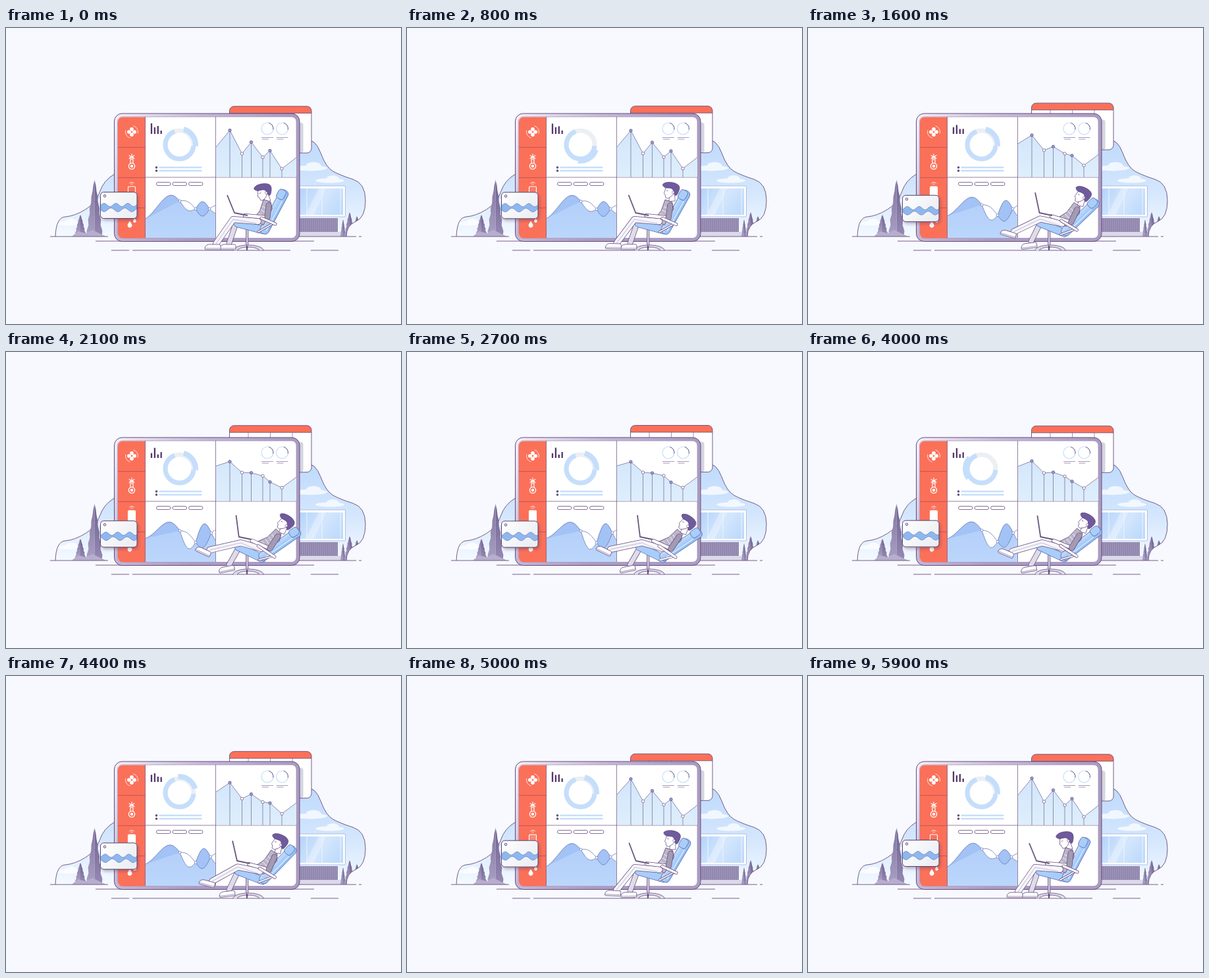
Animation, 600 px wide and 450 px high, one loop 6 s. Source, as an HTML page with a canvas:

```html
<!DOCTYPE html>
<html>
<head>
<meta charset="utf-8">
<title>Dashboard lounge</title>
<style>
html, body { margin: 0; width: 100%; height: 100%; overflow: hidden; background: #f7f9fe; }
canvas { display: block; width: 600px; height: 450px; }
</style>
</head>
<body>
<canvas id="stage"></canvas>
<script>
const LOOP = 6000, RAD = Math.PI / 180;
const INK = '#674a7c', RED = '#fb7059', SKY = '#c5defb', WHITE = '#fff', NAVY = '#5c69a8';
const canvas = document.getElementById('stage');
const ctx = canvas.getContext('2d');
const ratio = window.devicePixelRatio || 1;
canvas.width = 600 * ratio;
canvas.height = 450 * ratio;

const mix = (a, b, k) => a + (b - a) * k;
const mixAll = (a, b, k) => a.map((v, i) => mix(v, b[i], k));
const clamp = v => Math.max(0, Math.min(1, v));
const smooth = v => { v = clamp(v); return v * v * (3 - 2 * v); };
const smoother = v => { v = clamp(v); return v * v * v * (v * (v * 6 - 15) + 10); };

function paint(fill, stroke, width = 0.8) {
  if (fill) { ctx.fillStyle = fill; ctx.fill(); }
  if (stroke) { ctx.strokeStyle = stroke; ctx.lineWidth = width; ctx.stroke(); }
}

function line(pts, color = INK, width = 0.8) {
  ctx.beginPath();
  for (const [x, y] of pts) ctx.lineTo(x, y);
  paint(null, color, width);
}

function poly(pts, fill, stroke, width) {
  ctx.beginPath();
  for (const [x, y] of pts) ctx.lineTo(x, y);
  ctx.closePath();
  paint(fill, stroke, width);
}

const rule = (x0, x1, y, color, width) => line([[x0, y], [x1, y]], color, width);
const post = (x, y0, y1, color, width) => line([[x, y0], [x, y1]], color, width);

function box(x, y, w, h, r, fill, stroke, width) {
  ctx.beginPath();
  ctx.roundRect(x, y, w, h, r);
  paint(fill, stroke, width);
}

function disc(x, y, r, fill, stroke, width) {
  ctx.beginPath();
  ctx.arc(x, y, r, 0, 7);
  paint(fill, stroke, width);
}

function arc(x, y, r, from, to, color, width) {
  ctx.beginPath();
  ctx.arc(x, y, r, from * RAD, to * RAD);
  paint(null, color, width);
}

// Outlined thick line with round ends
function tube(pts, fill, width, edge = INK) {
  ctx.lineCap = 'round';
  line(pts, edge, width + 1.5);
  line(pts, fill, width);
  ctx.lineCap = 'butt';
}

// Soft curve through the midpoints of the given points
function curve(pts) {
  ctx.lineTo(...pts[0]);
  for (let i = 1; i < pts.length - 1; i++) {
    const [x, y] = pts[i], [nx, ny] = pts[i + 1];
    const last = i === pts.length - 2;
    ctx.quadraticCurveTo(x, y, last ? nx : (x + nx) / 2, last ? ny : (y + ny) / 2);
  }
}

function gradient(x0, y0, x1, y1, ...colors) {
  const g = ctx.createLinearGradient(x0, y0, x1, y1);
  colors.forEach((c, i) => g.addColorStop(i / (colors.length - 1), c));
  return g;
}

function clipped(trace, draw) {
  ctx.save();
  ctx.beginPath();
  trace();
  ctx.clip();
  draw();
  ctx.restore();
}

function hill() {
  curve([[75, 317], [76, 288], [104, 286], [137, 266], [148, 232], [180, 213], [300, 190]]);
  curve([[300, 190], [440, 172], [470, 168], [486, 212], [508, 224], [546, 236], [546, 288], [517, 300], [517, 317]]);
}

function cloud(x, y, w) {
  ctx.beginPath();
  ctx.ellipse(x, y, w, w * 0.16, 0, 0, 7);
  ctx.ellipse(x + w * 0.2, y - w * 0.1, w * 0.45, w * 0.26, 0, 0, 7);
  paint('rgba(255,255,255,.75)');
}

function tree(x, top, base, half) {
  const side = dir => {
    const pts = [[x, top]];
    for (let u = 0.1; u <= 1.01; u += 0.1)
      pts.push([x + dir * half * (u ** 0.8 + 0.08 * Math.sin(u * 30)), mix(top, base, u)]);
    return [...pts, [x, base]];
  };
  poly(side(-1), gradient(0, top, 0, base, '#83759f', '#a99fc4'));
  poly(side(1), gradient(0, top, 0, base, '#6f628f', '#9689b4'));
}

function landscape() {
  clipped(hill, () => {
    ctx.fillStyle = gradient(0, 175, 0, 317, '#c0dbfc', '#d3e6fd', '#f4f9ff');
    ctx.fillRect(60, 160, 500, 160);
    cloud(462, 213, 26); cloud(492, 232, 22); cloud(95, 297, 20); cloud(152, 262, 18);
    box(440, 240, 75.5, 47, 1, '#fafcff', '#9aa9d4', 0.7);
    ctx.fillStyle = gradient(447, 242, 510, 287, '#b3d3fa', '#d3e6fd', '#b9d7fa');
    ctx.fillRect(446, 244, 66, 40);
    poly([[455, 284], [475, 244], [487, 244], [467, 284]], 'rgba(255,255,255,.3)');
    for (const x of [457, 480, 508]) post(x, 244, 284, '#eef5ff', 1);
    ctx.fillStyle = '#a096ba';
    ctx.fillRect(444, 289, 60, 21);
    for (let x = 446; x < 504; x += 3) post(x, 289, 310, '#7f739c', 0.8);
    ctx.fillStyle = '#dcd8ea';
    ctx.fillRect(444, 310, 76, 7);
    tree(512, 291, 317, 4); tree(522, 280, 317, 8); tree(533, 286, 317, 8);
  });
  ctx.beginPath(); hill(); paint(null, INK, 0.9);
  tree(113, 284, 314, 8);
  tree(134.5, 231, 317, 12);
  poly([[100, 317], [109, 309], [121, 312], [131, 307], [152, 317]], '#b7aecd');
  for (const [from, to, y] of [[67, 155, 317], [445, 532, 317], [536, 540, 317],
    [136, 468, 324], [160, 187, 338], [192, 432, 338], [463, 505, 338]]) rule(from, to, y, INK, 0.9);
}

function backCard(p) {
  const y = mix(119, 111.5, p);
  const frame = () => ctx.roundRect(339.5, y, 124.5, 71, 7);
  clipped(frame, () => {
    ctx.fillStyle = WHITE; ctx.fillRect(339, y, 126, 72);
    ctx.fillStyle = RED; ctx.fillRect(339, y, 126, 10.5);
    rule(339, 465, y + 10.5);
    for (let i = 0; i < 3; i++) post(368 + i * 33.5, y + 10.5, y + 24, INK, 0.6);
    box(440, y + 25, 11.5, 46, 4, '#d3d5df');
  });
  ctx.beginPath(); frame(); paint(null, INK, 0.9);
}

function tablet() {
  box(164.5, 130, 281.5, 194.5, 12, gradient(164, 130, 330, 260, '#f4f1fa', '#c6bad9', '#aa9cc2'), INK, 1);
  box(169.5, 135, 271.5, 184.5, 7, WHITE, '#a293bc', 0.8);
  box(170, 135.5, 41.5, 184, [7, 0, 0, 7], RED);
  for (let i = 1; i < 4; i++) rule(170, 211, 135.5 + i * 46, '#b64f58');
  for (const x of [211.5, 318.5]) post(x, 135, 319, INK, 0.7);
  rule(212, 441, 227, INK, 0.7);
}

function drop(x, y, r) {
  ctx.beginPath();
  ctx.arc(x, y, r, -30 * RAD, 210 * RAD);
  ctx.lineTo(x, y - r * 2);
  ctx.closePath();
  paint(WHITE);
}

function icons(p) {
  for (let a = 0; a < 360; a += 90) disc(191 + Math.cos(a * RAD) * 4.2, 158 + Math.sin(a * RAD) * 4.2, 2.8, WHITE);
  disc(191, 158, 2.6, WHITE);
  disc(191, 158, 1.4, RED);
  for (const a of [-75, 105]) arc(191, 158, 9.5, a, a + 90, WHITE, 0.8);
  box(189, 195, 4, 14, 2, RED, WHITE, 1.2);
  disc(191, 210, 4.6, RED, WHITE, 1.4);
  disc(191, 210, 2.2, WHITE);
  for (let a = 30; a < 180; a += 60)
    line([1, -1].map(s => [191 + s * 5 * Math.cos(a * RAD), 196 + s * 5 * Math.sin(a * RAD)]), WHITE, 1.1);
  for (const r of [2, 4.5]) arc(191, 239, r, 215, 325, WHITE, 0.9);
  box(185.5, 241, 11, 17, 1.5, `rgba(255,255,255,${clamp(p * 2)})`, WHITE, 1.1);
  drop(188, 300, 3.4);
  drop(195.5, 293.5, 2.4);
}

function gauges(t, p) {
  mixAll([16, 10, 12, 5], [7, 15.5, 5, 9], p).forEach((h, i) => post(221 + i * 4.9, 161 - h, 161, '#54376a', 2.3));

  const spin = 360 * (smooth((t - 400) / 1200) + smooth((t - 3200) / 1400));
  arc(263.5, 177.5, 21.5, 0, 360, '#eceff4', 7);
  arc(263.5, 177.5, 21.5, 5, 250, SKY, 7);
  arc(263.5, 177.5, 24.5, -75 + spin, 5 + spin, SKY, 8);

  for (const y of [212, 217]) {
    disc(228.5, y, 1.8, '#61507f');
    box(232.5, y - 1.2, 65, 2.4, 1, SKY);
  }
  for (const x of [397, 419.5]) {
    disc(x, 153, 9, null, '#c5def9', 1.2);
    arc(x, 153, 9, -75, 10, INK, 0.9);
    rule(x - 9, x + 9, 166.5, '#927fa5');
    rule(x - 8, x + 2, 169, '#927fa5');
  }
  for (let i = 0; i < 3; i++) box(228.5 + i * 24.5, 234.5, 21.5, 5, 2.5, WHITE, INK);
}

function peaks(p) {
  const xs = [319, 340, 358.5, 372.5, 390, 401, 419, 441];
  const ys = mixAll([181, 155.5, 191, 173.5, 196.5, 186.5, 214, 197], [173, 167, 183, 184, 188, 198, 206, 190], p);
  const top = xs.map((x, i) => [x, ys[i]]);
  poly([...top, [441, 226.6], [319, 226.6]], gradient(0, 155, 0, 227, '#d2e6fb', '#deeefc'));
  line(top, '#78729f');
  top.slice(1, -1).forEach(([x, y], i) => {
    post(x, y, 227, '#6d6692', 0.7);
    disc(x, y, 2.2, i % 2 ? WHITE : '#8f9fd6', INK, 0.7);
  });
}

// Two curves cross at the nodes and bulge apart between them
function waves(p) {
  const nodes = [[212, mix(290, 283, p)], [264, mix(263, 272, p)], [288, mix(275, 290, p)],
    [mix(309, 312, p), 275], [336, 280]];
  const rise = [17, 5, mix(11, 21, p), 8], sag = [0, mix(8, 18, p), mix(11, 15, p), mix(6, 14, p)];
  const edge = (i, bulge, skew) => Array.from({ length: 17 }, (_, k) => {
    const u = k / 16, [x0, y0] = nodes[i], [x1, y1] = nodes[i + 1];
    return [mix(x0, x1, u), mix(y0, y1, u) + bulge * Math.sin(Math.PI * u ** skew)];
  });
  const lobes = rise.map((r, i) => [edge(i, -r, i ? 1 : 1.6), edge(i, sag[i], 1)]);
  clipped(() => ctx.rect(212, 228, 106, 91), () => {
    poly([...lobes.flatMap(([up, low], i) => i % 2 ? low : up), [336, 320], [212, 320]],
      gradient(0, 260, 0, 319, '#b2cffa', '#bcd6fb'));
    lobes.forEach(([up, low], i) => {
      poly([...up, ...low.reverse()], i % 2 ? WHITE : '#a3c2f5');
      line(up, '#6577b4');
      if (i) line(low, '#6577b4');
    });
  });
  for (const [x, y] of nodes.slice(1, 4)) disc(x, y, 1.9, WHITE, '#6577b4', 0.7);
}

function frontCard(p) {
  const y = mix(249.5, 257, p);
  const frame = () => ctx.roundRect(143.5, y, 55.5, 40, 5);
  ctx.save();
  ctx.shadowColor = 'rgba(90,50,90,.4)';
  ctx.shadowBlur = 5 * ratio;
  ctx.shadowOffsetX = 2 * ratio;
  ctx.shadowOffsetY = 3 * ratio;
  ctx.beginPath(); frame(); paint('#f3f4f8');
  ctx.restore();
  const ripple = (level, height, period) => Array.from({ length: 58 }, (_, i) =>
    [143 + i, y + level + height * Math.cos((i - 6) / period * 2 * Math.PI - p)]);
  clipped(frame, () => {
    ctx.fillStyle = gradient(143, y, 199, y + 40, '#ffffff', '#e9ebf1');
    ctx.fillRect(143, y, 57, 41);
    poly([...ripple(19.5, -2.5, 18), ...ripple(27, 2.8, 21).reverse()], '#8eb7f0', '#6780b8', 0.7);
  });
  ctx.beginPath(); frame(); paint(null, '#55456c', 1);
  disc(150, y + 5.8, 1.8, '#e6dce8', INK, 0.9);
}

function head(q) {
  ctx.save();
  ctx.translate(mix(-25, -19, q), mix(-45, -51, q));
  ctx.rotate((mix(-16, 0, q) - 28) * RAD);
  ctx.scale(0.9, 0.9);
  poly([[-2, 7], [7, 3], [8, 16], [-2, 17]], WHITE, INK);
  poly([[-8, -6], [-11, 4], [-9, 5.5], [-8, 11], [-4, 12], [2, 8], [7, 2], [6, -6]], WHITE, INK);
  rule(-7, -4, -1);
  ctx.beginPath();
  curve([[-9, -6], [-16, -10], [-8, -16], [8, -15], [17, -8], [11, 7], [7, 7], [5, -2], [1, -6], [-9, -6]]);
  paint('#6f5b9c', '#53407c', 0.7);
  disc(4.5, 1.5, 2, WHITE, INK, 0.6);
  ctx.restore();
}

function shoe(x, y, angle) {
  ctx.save();
  ctx.translate(x, y);
  ctx.rotate(angle);
  box(-12, -4, 24, 8, [8, 3, 1, 2], WHITE, INK);
  rule(-12, 12, 2, '#938ab4');
  ctx.restore();
}

function chairFoot() {
  box(364.5, 304, 3.5, 30, 1, '#c9c6dc', INK, 0.7);
  clipped(() => ctx.rect(340, 325, 60, 13.4), () => {
    ctx.beginPath();
    ctx.ellipse(368, 338, 23, 8, 0, 0, 7);
    ctx.ellipse(368, 339, 17, 6, 0, 0, 7);
    ctx.fillStyle = '#dcd9e9';
    ctx.fill('evenodd');
    paint(null, INK);
    post(366, 331, 338, INK, 2);
  });
}

function lounger(p, q) {
  const at = (x0, y0, x1, y1) => [mix(x0, x1, p), mix(y0, y1, p)];
  const hip = at(392, 302, 392, 306), lean = mix(28, 56, p) * RAD;
  const onBack = (x, y) => [hip[0] + x * Math.cos(lean) - y * Math.sin(lean),
    hip[1] + x * Math.sin(lean) + y * Math.cos(lean)];
  const farKnee = at(350, 294, 357, 292), farAnkle = at(339, 327, 339, 323);
  const knee = at(345, 291, 357, 290), ankle = at(319, 328, 309, 300);

  chairFoot();
  tube([farKnee, farAnkle], '#dedce9', 7);
  shoe(...at(337, 333, 335, 330), mix(0, -0.2, p));
  tube([at(352, 297, 353, 296), at(390, 307, 389, 314)], '#a8cdfa', 11, NAVY);

  ctx.save();
  ctx.translate(...hip);
  ctx.rotate(lean);
  box(-4, -64, 14, 74, 6, gradient(-4, 0, 10, 0, '#c3defd', '#8dbcf5'), NAVY);
  post(6, -48, 4, '#e7f2ff', 1.2);
  box(-6, -63, 12, 15, 4, '#a9cefa', NAVY);
  head(q);
  poly([[-20, -36], [-9, -38], [-2, -30], [-2, -2], [-21, 2], [-17, -18]], '#bcb6cb', INK);
  for (let y = -26; y < -4; y += 6) rule(-17, -5, y, '#e4e1ec', 1.1);
  ctx.restore();

  tube([at(383, 294, 388, 299), knee, ankle], '#f7f6fc', 8.5);
  line([at(380, 297, 384, 302), knee, ankle], '#cfcbde', 1.3);
  shoe(...at(314, 333, 299, 302), mix(0, 0.45, p));

  const elbow = at(397, 288, 401, 299);
  tube([elbow, at(363, 285, 374, 287)], WHITE, 4.5);
  tube([onBack(-9, -32), elbow], '#a29bb4', 7.5);
  const hinge = at(347, 281, 354, 281);
  line([at(336, 254, 350, 248), hinge, at(367, 285, 373, 285)], '#69577f', 1.8);
  tube([at(406, 297, 405, 311), at(383, 310, 384, 316)], WHITE, 1.8);
  tube([at(388, 289, 383, 295), at(409, 298, 408, 312)], WHITE, 3.4);
}

function render(t) {
  const p = smoother((t - 450) / 1980) * smoother((5470 - t) / 1980);
  const q = smooth((t - 150) / 650) * smooth((5700 - t) / 700);
  ctx.setTransform(ratio, 0, 0, ratio, 0, 0);
  ctx.lineJoin = 'round';
  ctx.fillStyle = '#f7f9fe';
  ctx.fillRect(0, 0, 600, 450);
  landscape();
  backCard(p);
  tablet();
  icons(p);
  gauges(t, p);
  peaks(p);
  waves(p);
  frontCard(p);
  lounger(p, q);
}

function tick() {
  render(Math.floor(performance.now() % LOOP / 100) * 100);
  requestAnimationFrame(tick);
}
tick();
</script>
</body>
</html>
```
